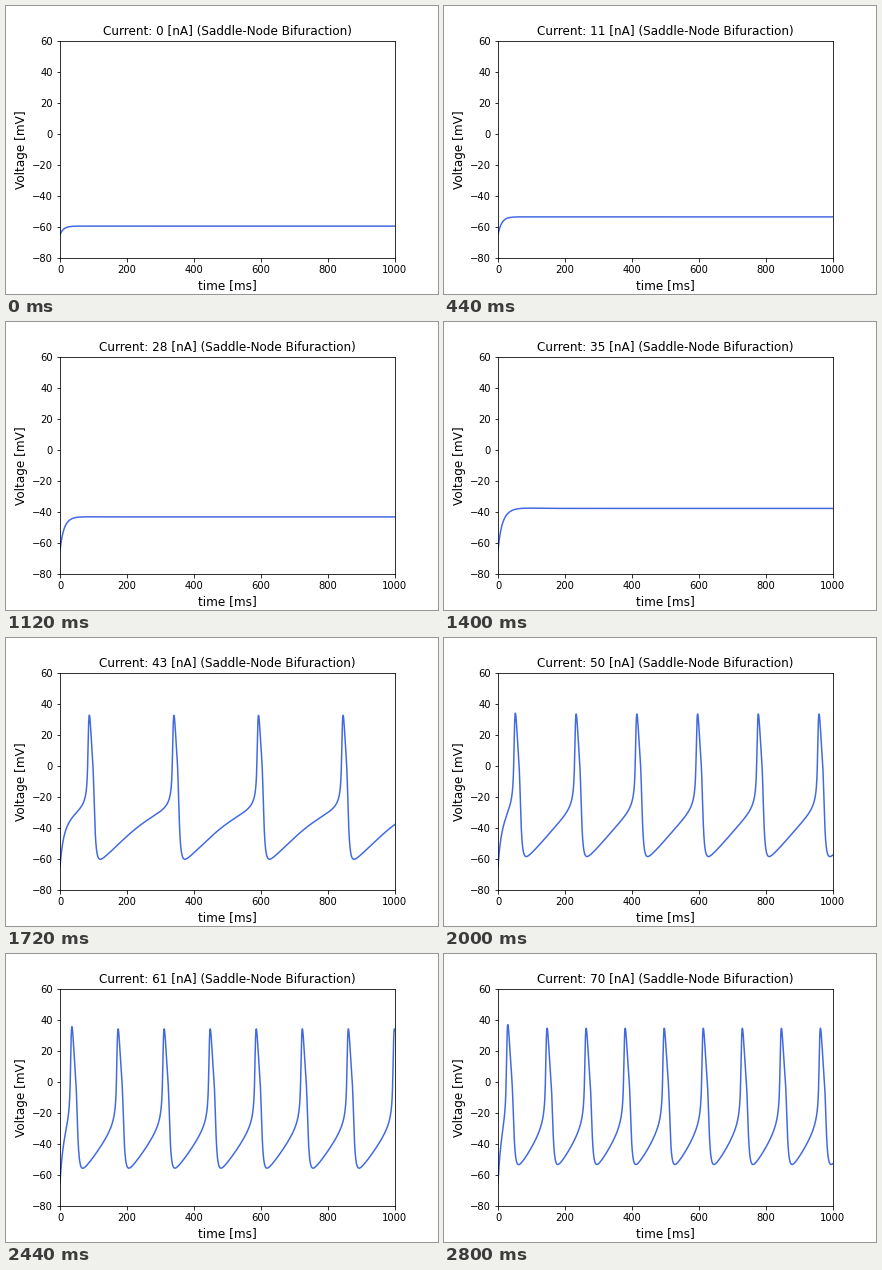
Write a matplotlib script that moves like this. It is 432 px wide and 288 px high and loops after 2.84 s.

```python
import numpy as np
import matplotlib.pyplot as plt
from matplotlib.animation import FuncAnimation

# Morris-Lecar neuron, saddle-node parameter set
C = 20.0
G_CA, G_K, G_L = 4.0, 8.0, 2.0
E_CA, E_K, E_L = 120.0, -84.0, -60.0
V1, V2, V3, V4 = -1.2, 18.0, 12.0, 17.4
PHI = 0.067
V0, W0 = -65.0, 0.0

STEP = 0.2
times = np.arange(0, 1000 + STEP / 2, STEP)
currents = np.arange(71)


def slope(state):
    v, w = state
    m_inf = 0.5 * (1 + np.tanh((v - V1) / V2))
    w_inf = 0.5 * (1 + np.tanh((v - V3) / V4))
    tau = np.cosh((v - V3) / (2 * V4))
    ionic = (G_CA * m_inf * (v - E_CA) + G_K * w * (v - E_K)
             + G_L * (v - E_L))
    return np.array([(currents - ionic) / C, PHI * (w_inf - w) / tau])


def simulate():
    """Integrate all currents at once with Runge-Kutta."""
    state = np.array([np.full(len(currents), V0),
                      np.full(len(currents), W0)])
    volts = np.empty((len(times), len(currents)))
    for n in range(len(times)):
        volts[n] = state[0]
        k1 = slope(state)
        k2 = slope(state + STEP / 2 * k1)
        k3 = slope(state + STEP / 2 * k2)
        k4 = slope(state + STEP * k3)
        state = state + STEP / 6 * (k1 + 2 * k2 + 2 * k3 + k4)
    return volts


volts = simulate()

plt.rcParams.update({"font.family": "DejaVu Sans", "font.size": 10})
fig, ax = plt.subplots(figsize=(6, 4), dpi=72)
fig.subplots_adjust(left=0.125, right=0.9, bottom=0.125, top=0.88)
ax.set_xlim(0, 1000)
ax.set_ylim(-80, 60)
ax.set_xlabel("time [ms]", fontsize=12)
ax.set_ylabel("Voltage [mV]", fontsize=12)
title = ax.set_title("", fontsize=12)
line, = ax.plot([], [], color="royalblue", lw=1.5)


def update(i):
    line.set_data(times, volts[:, i])
    title.set_text(f"Current: {currents[i]} [nA] (Saddle-Node Bifuraction)")
    return line, title


anim = FuncAnimation(fig, update, frames=len(currents), interval=40,
                     repeat=True, repeat_delay=0, blit=False)
plt.show()
```
